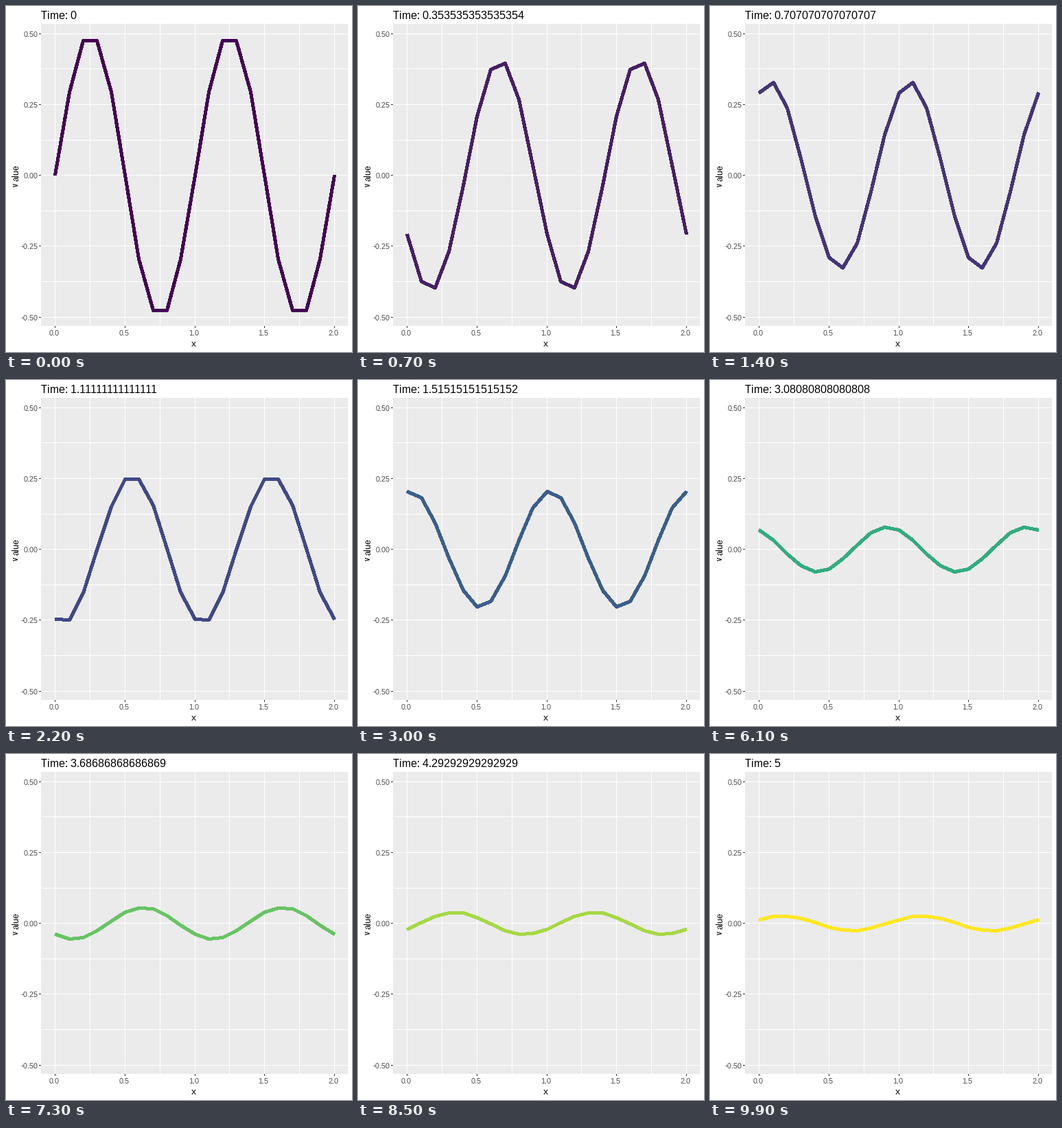
Recreate the animation shown at these times as a matplotlib script. Size 504 by 504 pixels, loop 10 s.

```python
import numpy as np
import matplotlib.pyplot as plt
from matplotlib.animation import FuncAnimation
from matplotlib.colors import to_rgb
from matplotlib.patches import Rectangle

SIZE, FRAMES, STEPS, T_END = 504, 100, 100, 5
LEFT, RIGHT, TOP, BOTTOM = 51, 498, 26, 466
ZERO_Y, SCALE_Y = 246.25, 412.7
COURANT, DIFFUSION, DX = 0.6, 0.25, 0.1

# Whole-pixel glyph advances
plt.rcParams.update({"font.family": "Liberation Sans",
                     "text.hinting": "native",
                     "text.hinting_factor": 1})


def px(x):
    return np.floor(LEFT + (RIGHT - LEFT) * (x + 0.1) / 2.2 + 0.5)


def py(v):
    return np.floor(ZERO_Y - SCALE_Y * v + 0.5)


# Advection-diffusion, explicit central differences: growth factor per step
theta = 2 * np.pi * DX
growth = 1 - 2 * DIFFUSION * (1 - np.cos(theta)) - 1j * COURANT * np.sin(theta)
xs = np.arange(21) * DX


def wave(step):
    return 0.5 * np.imag(growth ** step * np.exp(2j * np.pi * xs))


# Colour scale: viridis stops blended in CIE Lab
RGB_XYZ = np.array([[0.4124, 0.3576, 0.1805],
                    [0.2126, 0.7152, 0.0722],
                    [0.0193, 0.1192, 0.9505]])
WHITE = RGB_XYZ.sum(axis=1)
XYZ_LAB = np.array([[0, 116, 0], [500, -500, 0], [0, 200, -200]])
STOPS = ["#440154", "#414487", "#2A788E", "#22A884", "#7AD151", "#FDE725"]


def to_lab(color):
    c = np.array(to_rgb(color))
    lin = np.where(c > 0.04045, ((c + 0.055) / 1.055) ** 2.4, c / 12.92)
    q = RGB_XYZ @ lin / WHITE
    return XYZ_LAB @ np.where(q > 0.008856, np.cbrt(q), 7.787 * q + 16 / 116)


def from_lab(lab):
    f = np.linalg.solve(XYZ_LAB, lab)
    q = np.where(f > 6 / 29, f ** 3, (f - 16 / 116) / 7.787)
    lin = np.clip(np.linalg.solve(RGB_XYZ, q * WHITE), 0, 1)
    c = np.where(lin > 0.0031308, 1.055 * lin ** (1 / 2.4) - 0.055, 12.92 * lin)
    return tuple(np.clip(c, 0, 1))


LAB_STOPS = np.array([to_lab(s) for s in STOPS])


def scale_color(u):
    grid = np.linspace(0, 1, len(STOPS))
    return from_lab(np.array([np.interp(u, grid, ch) for ch in LAB_STOPS.T]))


fig = plt.figure(figsize=(SIZE / 72, SIZE / 72), dpi=72, facecolor="white")
ax = fig.add_axes([0, 0, 1, 1])
ax.set(xlim=(0, SIZE), ylim=(SIZE, 0))
ax.axis("off")


def box(x, y, w, h, color):
    ax.add_patch(Rectangle((x, y), w, h, fc=color, ec="none", lw=0))


def label(x, y, s, size, color="black", ha="left", **kw):
    return ax.text(x, y, s, size=size, color=color, ha=ha, va="baseline", **kw)


box(LEFT, TOP, RIGHT - LEFT, BOTTOM - TOP, "#EBEBEB")

for i, x in enumerate(np.arange(0, 2.01, 0.25)):
    gx = px(x)
    box(gx, TOP, 1, BOTTOM - TOP, "white")
    if i % 2 == 0:
        box(gx, BOTTOM, 1, 3, "#333333")
        label(gx - 1, 480, f"{x:.1f}", 11, "#4D4D4D", "center")

for i, v in enumerate(np.arange(-0.5, 0.51, 0.125)):
    gy = py(v)
    box(LEFT, gy, RIGHT - LEFT, 1, "white")
    if i % 2 == 0:
        box(LEFT - 3, gy, 3, 1, "#333333")
        label(46.5, gy + 5, f"{v:.2f}", 11, "#4D4D4D", "right")

label(273.5, 496, "x", 13, ha="center")
for y, s in ((263, "v"), (255, "alue")):
    label(18, y, s, 13, rotation=90, rotation_mode="anchor")

title = label(51, 19, "", 16)
# Without antialiasing every touched pixel is filled, so 4 covers 5 pixels
line, = ax.plot([], [], lw=4, antialiased=False, solid_capstyle="butt",
                solid_joinstyle="round", zorder=3)


def draw(i):
    # 101 solution steps shown on 100 frames: one is skipped halfway
    step = i + (i >= FRAMES // 2)
    title.set_text(f"Time: {i * T_END / (FRAMES - 1):.15g}")
    line.set_data(px(xs) + 0.5, py(wave(step)) + 0.5)
    line.set_color(scale_color(step / STEPS))
    return title, line


anim = FuncAnimation(fig, draw, frames=FRAMES, interval=100,
                     repeat=True, repeat_delay=0)
plt.show()
```
